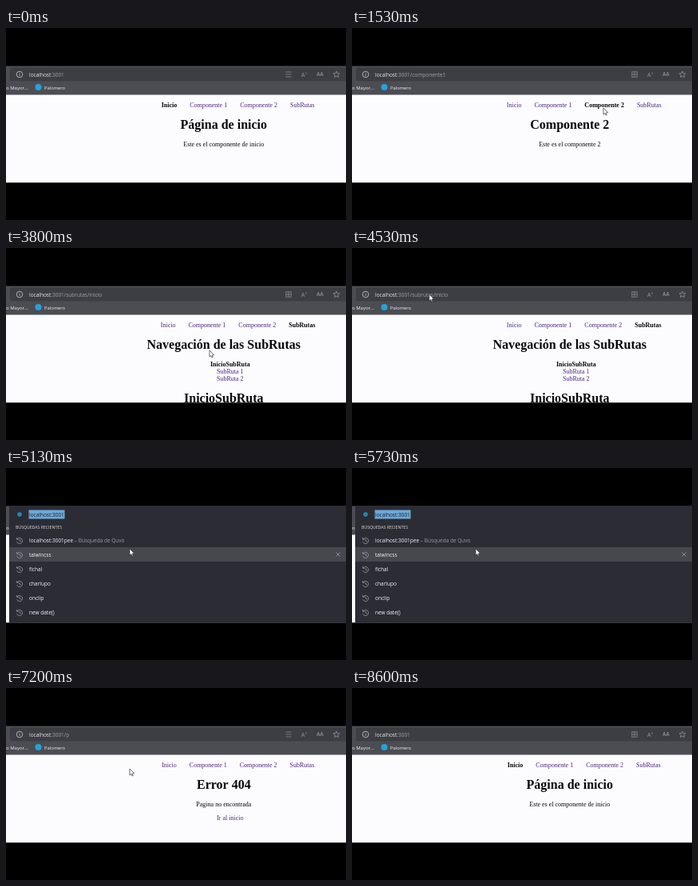
Recreate the animation shown at these times as an HTML page with a canvas. Size 426 by 240 pixels, loop 8.67 s.

```html
<!DOCTYPE html>
<html lang="es">
<head>
<meta charset="utf-8">
<title>Rutas</title>
<style>
html, body { margin: 0; width: 100%; height: 100%; overflow: hidden; background: #000; }
canvas { display: block; width: 426px; height: 240px; }
</style>
</head>
<body>
<canvas id="stage"></canvas>
<script>
const canvas = document.getElementById('stage');
const ctx = canvas.getContext('2d');
const ratio = window.devicePixelRatio || 1;
canvas.width = 426 * ratio;
canvas.height = 240 * ratio;

const LOOP = 8670, STEP = LOOP / 130;
const UI = '"Open Sans", "Noto Sans", sans-serif';
const SERIF = '"Liberation Serif", serif';
const INK = '#08080a', LINK = '#4c2580', LIGHT = '#f4f4f8', DIM = '#9a9aa2', BLUE = '#62b2dc';
const MID = 272.8;
const TOP = 47.4, BOTTOM = 193.4;
const HOST = 'localhost:3001';

// Each entry: start time, page, address path
const VISITS = [
  [0, 'home', ''],
  [870, 'c1', '/'],
  [940, 'c1', '/componente1'],
  [1450, 'c2', '/componente1'],
  [1580, 'c2', '/componente2'],
  [2270, 'sub0', '/subrutas/inicio'],
  [2800, 'sub1', '/subrutas/subruta1'],
  [3200, 'sub2', '/subrutas/subruta2'],
  [3540, 'sub0', '/subrutas/inicio'],
  [6800, 'lost', '/p'],
  [7930, 'home', '']
];
const PAGES = {
  home: { tab: 0, title: 'Página de inicio', body: 'Este es el componente de inicio' },
  c1: { tab: 1, title: 'Componente 1', body: 'Este es el componente 1' },
  c2: { tab: 2, title: 'Componente 2', body: 'Este es el componente 2' },
  sub0: { tab: 3, sub: 0 },
  sub1: { tab: 3, sub: 1 },
  sub2: { tab: 3, sub: 2 },
  lost: { tab: -1, title: 'Error 404', body: 'Pagina no encontrada', back: true }
};
const TABS = ['Inicio', 'Componente 1', 'Componente 2', 'SubRutas'];
const SUBS = ['InicioSubRuta', 'SubRuta 1', 'SubRuta 2'];

// Pointer path: time, x, y of the tip
const PATH = [
  [270, 250, 200], [760, 256, 98], [950, 256, 98], [1400, 315, 100], [1650, 315, 100],
  [2130, 370, 97], [2340, 370, 97], [2720, 279, 153], [2860, 279, 153], [3120, 278, 161],
  [3260, 278, 161], [3470, 276, 144], [3580, 276, 144], [3800, 255, 128], [4000, 240, 120],
  [4600, 92, 56], [4750, 92, 56], [5080, 155, 101], [7330, 155, 101], [7820, 281, 160],
  [8000, 281, 160], [8450, 300, 200]
];
const RECENT_FROM = 4700, TYPED_FROM = 6130, KEY_P = 6530, LIST_END = 6800;

function box(x, y, w, h, color) {
  ctx.fillStyle = color;
  ctx.fillRect(x, y, w, h);
}

function disc(x, y, r, color) {
  ctx.fillStyle = color;
  ctx.beginPath();
  ctx.arc(x, y, r, 0, 7);
  ctx.fill();
}

function stroke(color, width, trace) {
  ctx.strokeStyle = color;
  ctx.lineWidth = width;
  ctx.beginPath();
  trace();
  ctx.stroke();
}

function ring(x, y, r, color) {
  stroke(color, 0.8, () => ctx.arc(x, y, r, 0, 7));
}

// points: flat x, y pairs
function line(points, color = DIM, width = 0.8) {
  stroke(color, width, () => {
    for (let i = 0; i < points.length; i += 2) ctx.lineTo(points[i], points[i + 1]);
  });
}

function text(str, x, y, size, color, family = UI, weight = 400, align = 'left') {
  ctx.font = `${weight} ${size}px ${family}`;
  ctx.textAlign = align;
  ctx.fillStyle = color;
  ctx.fillText(str, x, y);
  return ctx.measureText(str).width;
}

// parts: [string, color, weight]
function runs(parts, x, y, size = 6.5) {
  for (const [str, color, weight] of parts) x += text(str, x, y, size, color, UI, weight);
  return x;
}

function centred(str, x, y, size, color = INK, weight = 400) {
  text(str, x, y, size, color, SERIF, weight, 'center');
}

function globe(x, y) {
  disc(x, y, 3, '#1c6f93');
  ring(x, y, 1.6, '#43a3c4');
}

// Clock face open at the left, with a return arrow at the gap
function clock(x, y) {
  stroke(DIM, 0.8, () => ctx.arc(x, y, 3.6, -2.6, 2.8));
  line([x - 3.6, y - 4, x - 3.4, y - 1.7, x - 1.2, y - 1.7]);
  line([x, y - 2, x, y, x + 2, y + 1]);
}

function cross(x, y) {
  line([x - 2.5, y - 2.5, x + 2.5, y + 2.5]);
  line([x + 2.5, y - 2.5, x - 2.5, y + 2.5]);
}

function drawTools(t) {
  const reading = t < 600 || (t > 6800 && t < 7930);
  if (reading) {
    for (const y of [55, 58, 61]) line([350.5, y, 357.5, y], '#8a8a90');
  } else {
    ctx.strokeStyle = '#8a8a90';
    ctx.lineWidth = 0.8;
    ctx.strokeRect(350.8, 54.8, 6.4, 6.4);
    line([354, 55, 354, 61], '#8a8a90');
    line([351, 58, 357, 58], '#8a8a90');
  }
  text('A', 370, 61, 7, '#94949a');
  text('»', 375, 57.5, 4.5, '#94949a');
  text('AA', 389.3, 60.4, 6.2, '#94949a', UI, 600);
  stroke('#94949a', 0.8, () => {
    for (let i = 0; i < 10; i++) {
      const a = i * Math.PI / 5 - Math.PI / 2, r = i % 2 ? 1.9 : 4.2;
      ctx.lineTo(414 + r * Math.cos(a), 58.2 + r * Math.sin(a));
    }
    ctx.closePath();
  });
}

function drawChrome(path, t) {
  box(0, 47, 426, 37, '#4b4d53');
  ctx.fillStyle = '#3d3e44';
  ctx.beginPath();
  ctx.roundRect(5, 49.5, 430, 17, 3);
  ctx.fill();
  ring(17, 58, 3.8, '#c8c8cc');
  line([17, 57.5, 17, 60], '#c8c8cc');
  line([17, 55.8, 17, 56.6], '#c8c8cc');
  runs([['localhost', '#e6e6ea'], [':3001' + path, '#a2a2a8']], 29, 60.5);
  drawTools(t);
  text('o Mayor...', 0, 76.5, 6, LIGHT);
  disc(40.5, 74, 4, '#27a1da');
  text('Palomero', 48, 76.5, 5.8, LIGHT);
}

function drawTabs(active) {
  const weights = TABS.map((_, i) => i === active ? 700 : 400);
  const widths = TABS.map((name, i) => {
    ctx.font = `${weights[i]} 8px ${SERIF}`;
    return ctx.measureText(name).width;
  });
  let x = 290.7 - (widths.reduce((a, b) => a + b) + 48) / 2;
  TABS.forEach((name, i) => {
    text(name, x, 99, 8, i === active ? INK : LINK, SERIF, weights[i]);
    x += widths[i] + 16;
  });
}

function drawPage({ tab, sub, title, body, back }) {
  box(0, 83.5, 426, 110, '#fcfcfe');
  drawTabs(tab);
  if (sub === undefined) {
    centred(title, MID, 126, 16, INK, 700);
    centred(body, MID, 148, 8);
    if (back) centred('Ir al inicio', 280.8, 165, 8, LINK);
    return;
  }
  centred('Navegación de las SubRutas', MID, 126, 16, INK, 700);
  SUBS.forEach((name, i) => {
    const on = i === sub;
    centred(name, 280.8, 148 + i * 9, 8, on ? INK : LINK, on ? 700 : 400);
  });
  centred(SUBS[sub], MID, 192.7, 16, INK, 700);
}

function drawRecent() {
  globe(17, 58);
  box(28.5, 52.5, 45, 11, '#6da9d8');
  text(HOST, 29, 60.5, 6.5, '#16202c');
  text('BÚSQUEDAS RECIENTES', 12, 76, 5.1, '#b4b4c0', UI, 600);
  box(4, 99, 422, 18, '#47474e');
  const names = [HOST + 'pee', 'talwincss', 'fichal', 'charlupo', 'onclip', 'new date()'];
  names.forEach((name, i) => {
    const y = 91 + i * 18;
    clock(17, y);
    const parts = [[name, LIGHT]];
    if (!i) parts.push([' – Búsqueda de Quvo', DIM]);
    runs(parts, 29, y + 2.3);
  });
  cross(416, 108);
}

function drawTyped(t) {
  const tail = t < KEY_P ? '/' : '/p';
  globe(17, 58);
  const end = runs([['localhost', LIGHT], [':3001' + tail, '#b0b0b6']], 29, 60.5);
  line([end + 0.8, 54, end + 0.8, 62.5], LIGHT, 0.7);
  box(4, 68, 422, 17, '#36363f');
  box(5, 69.5, 1.5, 14, '#4aa3d2');
  box(4, 85, 422, 18, '#47474e');
  cross(416, 76.5);

  const app = ['React App - ', LIGHT], host = [HOST, BLUE, 700];
  const rows = [
    [app, [HOST, LIGHT, 700]],
    [[HOST + tail, LIGHT], [' - Búsqueda de Quvo', DIM]],
    [app, host, ['/contact', BLUE]],
    [app, host, ['/subrutas', BLUE]],
    [app, host, ['/p', BLUE]],
    [host, ['/peep', BLUE]]
  ];
  rows.forEach((parts, i) => {
    const y = 77 + i * 18;
    if (i === 1) {
      ring(16, y - 1, 2.6, DIM);
      line([18, y + 1, 20.5, y + 3.5]);
    } else globe(17, y);
    runs(parts, 29, y + 2.3);
  });

  box(4, 177.5, 422, 0.8, '#55555c');
  text('Filtre la búsqueda:', 14, 190.3, 6, '#77777e');
  clock(81, 188);
  text('Historial', 88.5, 190.3, 6, LIGHT);
  ctx.strokeStyle = DIM;
  ctx.lineWidth = 0.8;
  ctx.strokeRect(125.5, 185, 7, 6);
  text('Pestañas', 137, 190.3, 6, LIGHT);
  ring(414.5, 188, 3.4, DIM);
  ring(414.5, 188, 1.3, DIM);
}

function drawList(t) {
  box(4, 47, 422, 147, '#2c2c35');
  if (t < TYPED_FROM) drawRecent();
  else drawTyped(t);
}

function drawPointer(t) {
  const i = PATH.findIndex(p => p[0] > t);
  if (i < 1) return;
  const [t0, x0, y0] = PATH[i - 1], [t1, x1, y1] = PATH[i];
  const k = (t - t0) / (t1 - t0), e = k * k * (3 - 2 * k);
  ctx.save();
  ctx.translate(x0 + (x1 - x0) * e, y0 + (y1 - y0) * e);
  ctx.beginPath();
  for (const [x, y] of [[0, 0], [0, 8], [1.8, 6.4], [3, 9], [4.3, 8.4], [3.2, 5.9], [5.6, 5.7]]) ctx.lineTo(x, y);
  ctx.closePath();
  ctx.fillStyle = '#fff';
  ctx.fill();
  ctx.strokeStyle = '#333338';
  ctx.lineWidth = 0.7;
  ctx.stroke();
  ctx.restore();
}

function draw(t) {
  ctx.setTransform(ratio, 0, 0, ratio, 0, 0);
  box(0, 0, 426, 240, '#000');
  ctx.save();
  ctx.beginPath();
  ctx.rect(0, TOP, 426, BOTTOM - TOP);
  ctx.clip();
  const [, page, path] = VISITS.filter(v => v[0] <= t).pop();
  drawChrome(path, t);
  drawPage(PAGES[page]);
  if (t >= RECENT_FROM && t < LIST_END) drawList(t);
  drawPointer(t);
  ctx.restore();
}

const start = performance.now();
function tick() {
  const t = (performance.now() - start) % LOOP;
  // Steps begin slightly early, as their times are rounded to 10 ms
  draw(Math.floor(t / STEP + 0.1) * STEP);
  requestAnimationFrame(tick);
}
tick();
</script>
</body>
</html>
```
